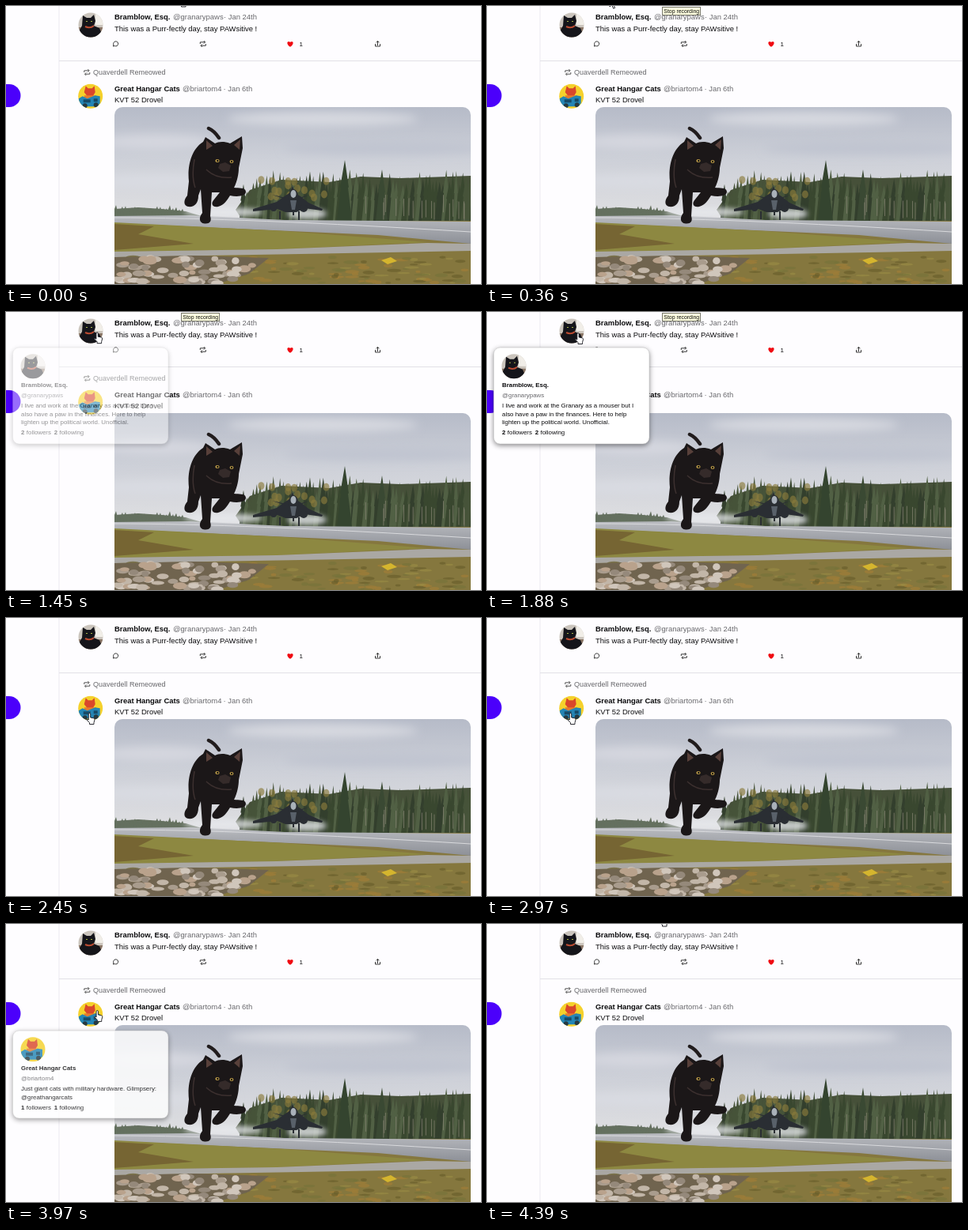
Write an HTML page that moves like this. It is 600 px wide and 352 px high and loops after 4.42 s.

```html
<!DOCTYPE html>
<html lang="en">
<head>
<meta charset="utf-8">
<title>Social feed hover cards</title>
<style>
  html, body { margin: 0; width: 100%; height: 100%; overflow: hidden; background: #fefdff; }
  svg { display: block; }
  text { font: 9.45px "Liberation Sans", Arial, sans-serif; fill: #0b0b0d; white-space: pre; }
  .b { font-weight: bold; }
  .g { fill: #68686c; }
  .card text { font-size: 7.9px; }
  .card > rect { filter: drop-shadow(0 2px 3px rgba(0,0,0,.45)); }
  .icon { fill: none; stroke: #222; stroke-width: .9; stroke-linejoin: round; }
</style>
</head>
<body>
<svg width="600" height="352" viewBox="0 0 600 352">
  <defs>
    <linearGradient id="sky" x2="0" y2="1">
      <stop stop-color="#b6bbc8"/><stop offset=".45" stop-color="#cdd0d8"/><stop offset="1" stop-color="#e0e0e2"/>
    </linearGradient>
    <linearGradient id="road" x2="0" y2="1">
      <stop stop-color="#b9bbc0"/><stop offset="1" stop-color="#8d9097"/>
    </linearGradient>
    <filter id="soft" x="-30%" y="-60%" width="160%" height="220%"><feGaussianBlur stdDeviation="6"/></filter>
    <filter id="mist" x="-30%" y="-60%" width="160%" height="220%"><feGaussianBlur stdDeviation="3"/></filter>
    <clipPath id="frame"><rect x="137" y="128" width="450" height="240" rx="10"/></clipPath>
    <clipPath id="round"><circle r="15.5"/></clipPath>
    <g id="mouser" clip-path="url(#round)">
      <path fill="#cbc5bd" d="M-16-16h32v32h-32z"/>
      <path fill="#8a7666" d="M-16 3h32v13h-32z"/>
      <path fill="#f1eee8" d="M6-16h10V0H6z"/>
      <path fill="#15151a" d="M-10-12l5 3h5l4-4 2 8-2 6 7 3 3 7-10 5h-14l-5-8 4-7z"/>
      <path fill="none" stroke="#b94b32" stroke-width="2" d="M-7 2Q-1 5 4 1"/>
      <path fill="#a9b34a" d="M-6-5h2v1h-2zM0-5h2v1H0z"/>
    </g>
    <g id="driver" clip-path="url(#round)">
      <path fill="#f5d12c" d="M-16-16h32v32h-32z"/>
      <path fill="#d9472b" d="M-6-13l3 3h5l3-3 1 8-3 5h-7l-4-5z"/>
      <path fill="#e57b2c" d="M-8-1h15v5H-8z"/>
      <path fill="#2485b4" d="M-15 3l5-3 6 3 10-4 6 1v9l-4 4h-20l-3-4z"/>
      <path fill="#174b68" d="M-9 4h9v4h-9zM4 3h5v4H4z"/>
      <circle cx="-7" cy="12" r="3" fill="#263a42"/><circle cx="7" cy="11" r="3" fill="#263a42"/>
    </g>
    <path id="repeat" d="M-3.5 0v-2.2h6M1-4l1.8 1.8L1-.4M3.5 0v2.2h-6M-1 4l-1.8-1.8L-1 .4"/>
  </defs>

  <rect width="600" height="352" fill="#fefdff"/>
  <path stroke="#ebe9f0" d="M67 0V352"/>
  <path stroke="#e1e1e6" d="M67 69.5H600"/>
  <path fill="#4b00fb" d="M0 99h4a14.5 14.5 0 0 1 0 29H0z"/>

  <use href="#mouser" x="107" y="24"/>
  <text class="b" x="137" y="17.4">Bramblow, Esq.</text>
  <text class="g" x="211" y="17.4">@granarypaws</text>
  <text class="g" x="275" y="17.4">· Jan 24th</text>
  <text x="137" y="32.2">This was a Purr-fectly day, stay PAWsitive !</text>
  <g class="icon">
    <path d="M135.4 51l.5-2a3 3 0 1 1 1.4 1.5z"/>
    <use href="#repeat" x="248.8" y="48"/>
    <path d="M466.5 48v3h6v-3M469.5 50v-5.5M467.5 46.3l2-2 2 2"/>
  </g>
  <path fill="#f00a12" d="M359 51.8c-6-4-3.6-9 0-6 3.6-3 6 2 0 6z"/>
  <text x="370.5" y="51" style="font-size:8px">1</text>

  <use class="icon" href="#repeat" transform="translate(102.3 84)" style="stroke:#444"/>
  <text class="g" x="110" y="87.4" style="font-size:9px">Quaverdell Remeowed</text>
  <use href="#driver" x="106.7" y="114.3"/>
  <text class="b" x="137" y="107.6">Great Hangar Cats</text>
  <text class="g" x="223" y="107.6">@briartom4</text>
  <text class="g" x="274.5" y="107.6">· Jan 6th</text>
  <text x="137" y="122.3">KVT 52 Drovel</text>

  <g clip-path="url(#frame)">
    <rect x="137" y="128" width="450" height="145" fill="url(#sky)"/>
    <g filter="url(#soft)">
      <ellipse cx="400" cy="143" rx="120" ry="9" fill="#d7d9e0"/>
      <ellipse cx="190" cy="172" rx="70" ry="9" fill="#d5d7df"/>
      <ellipse cx="480" cy="180" rx="130" ry="8" fill="#c0c4d0"/>
      <ellipse cx="200" cy="222" rx="90" ry="9" fill="#d9dbe2"/>
    </g>
    <g id="trees"></g>
    <rect x="137" y="272" width="450" height="80" fill="#85773e"/>
    <path fill="url(#road)" d="M137 266l95-1 120 6 235 2v28l-117-11-333-15z"/>
    <path stroke="#d9dadd" fill="none" d="M137 268q160 0 450 18"/>
    <path fill="#8d8841" d="M137 274l215 11 180 14-190 9-205 3z"/>
    <path fill="#766533" d="M137 276l50 3-20 10 70 12-100 8z"/>
    <path fill="#aaa8a4" d="M137 311l205-3 190-8 55 1v9l-215 4-235 4z"/>
    <g id="grass"></g>
    <g id="rocks"></g>

    <g filter="url(#mist)" fill="#e6e8ec" opacity=".8">
      <ellipse cx="275" cy="261" rx="50" ry="6"/><ellipse cx="380" cy="263" rx="25" ry="7"/>
    </g>
    <g fill="#2a2e33">
      <path d="M312 257l30-9 11-8 5-3 4-9 3 9 7 4 10 8 18 8-1 2-22-3-10 5h-14l-10-4-31 3z"/>
      <path d="M336 239l18 4v2zM383 239l-13 4v2z"/>
      <ellipse cx="363" cy="246" rx="7" ry="14"/>
      <circle cx="338" cy="256" r="4"/><circle cx="376" cy="256" r="5"/>
      <path d="M345 260h2v10h-2zM369 260h2v11h-2zM362 258h2v7h-2z"/>
    </g>
    <ellipse cx="363" cy="238" rx="3.5" ry="5" fill="#a9b1b9"/>
    <path fill="#59616a" d="M359 246h8l-2 12h-4z"/>

    <path fill="none" stroke="#211c1d" stroke-width="4.5" stroke-linecap="round" d="M269 167q-6-9-13-12"/>
    <path fill="#1b1718" d="M249 172C233 182 229 205 231 222l-2 18c-5 6-5 13 1 14 8 1 13-4 13-14l3-8 2 30c-5 6-4 13 3 13.500 7 .5 9-3.500 7-9.500l2-30h10l-8 10c-4 6 0 9 6 8 8-2 11-8 15-14 9 2 20 1 20-5-1-6-9-4-15-5 4-8 6-18 6-25l5-25-1-15-15 9c-8-3-15-2-19 0l-12-8z"/>
    <path fill="#58403a" d="M253 170l8 7-8 5zM296 169l-8 7 7 6z"/>
    <path fill="#352b2a" d="M270 200l7-2 7 4-2 7-8 1-6-5z"/>
    <path fill="none" stroke="#3c302f" stroke-width="1.5" d="M253 207q12 12 32 10M238 194q-4 22 1 36"/>
    <g fill="#c9a64c"><ellipse cx="267" cy="196" rx="2.6" ry="2"/><ellipse cx="285" cy="197" rx="2.4" ry="2"/></g>
    <g fill="#111"><circle cx="267.300" cy="196" r="1.200"/><circle cx="285" cy="197" r="1.200"/></g>
  </g>

  <g id="cards"></g>
  <g id="tip">
    <rect x="221.500" y="1.500" width="48" height="10" fill="#ffffdf" stroke="#77776c"/>
    <text x="223.300" y="8.900" style="font-size:6.900px">Stop recording</text>
  </g>
  <g id="cursor" fill="#fff" stroke="#15151c" stroke-width=".9" stroke-linejoin="round">
    <path id="arrow" d="M0 0v11.500l2.700-2.500 2 4.700 1.900-.8-2-4.600h3.700z"/>
    <path id="hand" d="M-1.200 8V.8a1.200 1.200 0 0 1 2.400 0V5l4 .8q1.500.4 1.300 2L5.500 11.500v2H0v-2L-3.500 8q0-2 2.300 0z"/>
  </g>
</svg>
<script>
const LOOP = 4420;
const el = id => document.getElementById(id);

let seed = 7;
const rnd = (a, b) => {
  seed = seed * 16807 % 2147483647;
  return a + (b - a) * seed / 2147483647;
};
const pick = list => list[Math.floor(rnd(0, list.length))];
const repeat = (n, make) => Array.from({ length: n }, (_, i) => make(i)).join('');

// Scenery
const spruce = (x, top, base, w, color) =>
  `<path fill="${color}" d="M${x} ${top}l${w * .5} ${(base - top) * .45}h-1l${w * .5} ${(base - top) * .55}h${1 - 2 * w}l${w * .5} ${(top - base) * .55}h-1z"/>`;
el('trees').innerHTML =
  '<path fill="#65705f" d="M137 257l30-2 30 2 30 3 20 6H137z"/>' +
  repeat(22, i => spruce(139 + i * 4, rnd(252, 258), 266, 3, '#64705f')) +
  '<path fill="#465039" d="M290 258l18-25 40-13 60 3 40-7 50 2 89-3v58H300z"/>' +
  repeat(70, i => spruce(300 + i * 4.2, rnd(207, 227) + Math.max(0, 8 - i) * 2, 272, rnd(4, 7),
    pick(['#39472f', '#465339', '#516044', '#333f2d']))) +
  spruce(428, 195, 272, 10, '#34442f') + spruce(475, 207, 272, 8, '#3a4933') +
  repeat(16, () => `<ellipse cx="${rnd(322, 405)}" cy="${rnd(220, 243)}" rx="4" ry="5" fill="#8b7b3d" opacity=".65"/>`) +
  repeat(18, () => `<path stroke="#8b8978" stroke-width=".7" d="M${rnd(420, 586)} ${rnd(238, 250)}v22"/>`);
el('grass').innerHTML = repeat(120, () =>
  `<ellipse cx="${rnd(137, 587)}" cy="${rnd(318, 352)}" rx="${rnd(3, 10)}" ry="${rnd(1, 2.5)}" fill="${pick(['#6a602c', '#978a45', '#76733a', '#a07d38'])}" opacity=".7"/>`) +
  '<path fill="#d5b52e" d="M474 322l12-4 8 5-12 4z"/>';
el('rocks').innerHTML =
  '<path fill="#70644f" d="M137 318l100-2 95 3-25 20-40 13H137z"/>' +
  repeat(65, () => {
    const y = rnd(319, 352), x = rnd(140, 328 - (y - 319) * 1.5);
    return `<ellipse cx="${x}" cy="${y}" rx="${rnd(4, 9)}" ry="${rnd(2.5, 4.5)}" fill="${pick(['#c2b6a8', '#a99c8d', '#d0c6bb', '#95897b', '#b9a28c'])}"/>`;
  });

// Profile cards
const card = (id, top, height, avatar, name, handle, count, lines) => {
  const line = (y, text, cls = '', x = 19) => `<text x="${x}" y="${top + y}" class="${cls}">${text}</text>`;
  const end = 78 + 10.8 * lines.length;
  return `<g class="card" id="${id}">
    <rect x="8.5" y="${top}" width="196.5" height="${height}" rx="8" fill="#fff" stroke="#bbb" stroke-width=".5"/>
    <use href="#${avatar}" x="34" y="${top + 23.7}"/>` +
    line(49.7, name, 'b') + line(62.6, handle, 'g') +
    lines.map((text, i) => line(75.7 + i * 10.8, text)).join('') +
    line(end, count, 'b') + line(end, 'followers', '', 25.8) +
    line(end, count, 'b', 60.7) + line(end, 'following', '', 67.5) + '</g>';
};
el('cards').innerHTML =
  card('card1', 45, 122, 'mouser', 'Bramblow, Esq.', '@granarypaws', 2, [
    'I live and work at the Granary as a mouser but I',
    'also have a paw in the finances. Here to help',
    'lighten up the political world. Unofficial.']) +
  card('card2', 135, 111, 'driver', 'Great Hangar Cats', '@briartom4', 1, [
    'Just giant cats with military hardware. Glimpsery:',
    '@greathangarcats']);

// Pointer stops: time, x, y
const path = [
  [0, 221.5, -12.5], [30, 221.5, -12.5], [360, 155, -10.5], [560, 132, 6],
  [900, 115.5, 23.5], [1120, 115.5, 23.5], [1600, 115, 27], [2210, 115, 27],
  [2420, 105.5, 121], [3880, 105.5, 121], [4390, 221.5, -10.5], [LOOP, 221.5, -12.5]
];
const pointer = t => {
  const i = path.findIndex(p => p[0] > t);
  const [t0, x0, y0] = path[i - 1], [t1, x1, y1] = path[i];
  const k = (t - t0) / (t1 - t0), e = k * k * (3 - 2 * k);
  return [x0 + (x1 - x0) * e, y0 + (y1 - y0) * e];
};
const fade = (t, from, to) =>
  Math.max(0, Math.min(1, (t - from) / 120, (to - t) / 60));
const show = (id, on) => el(id).setAttribute('visibility', on ? 'visible' : 'hidden');

const start = performance.now();
function draw(now) {
  const t = Math.max(0, now - start) % LOOP;
  const [x, y] = pointer(t);
  const arrow = t > 60 && t < 680 || t > 2270 && t < 2350 || t > 4000 && t < 4300;
  el('cursor').setAttribute('transform', `translate(${x} ${y})`);
  show('arrow', arrow);
  show('hand', !arrow);
  show('tip', t >= 240 && t < 2060);
  el('card1').style.opacity = fade(t, 1400, 2320);
  el('card2').style.opacity = fade(t, 2980, 4020);
  requestAnimationFrame(draw);
}
draw(start);
</script>
</body>
</html>
```
